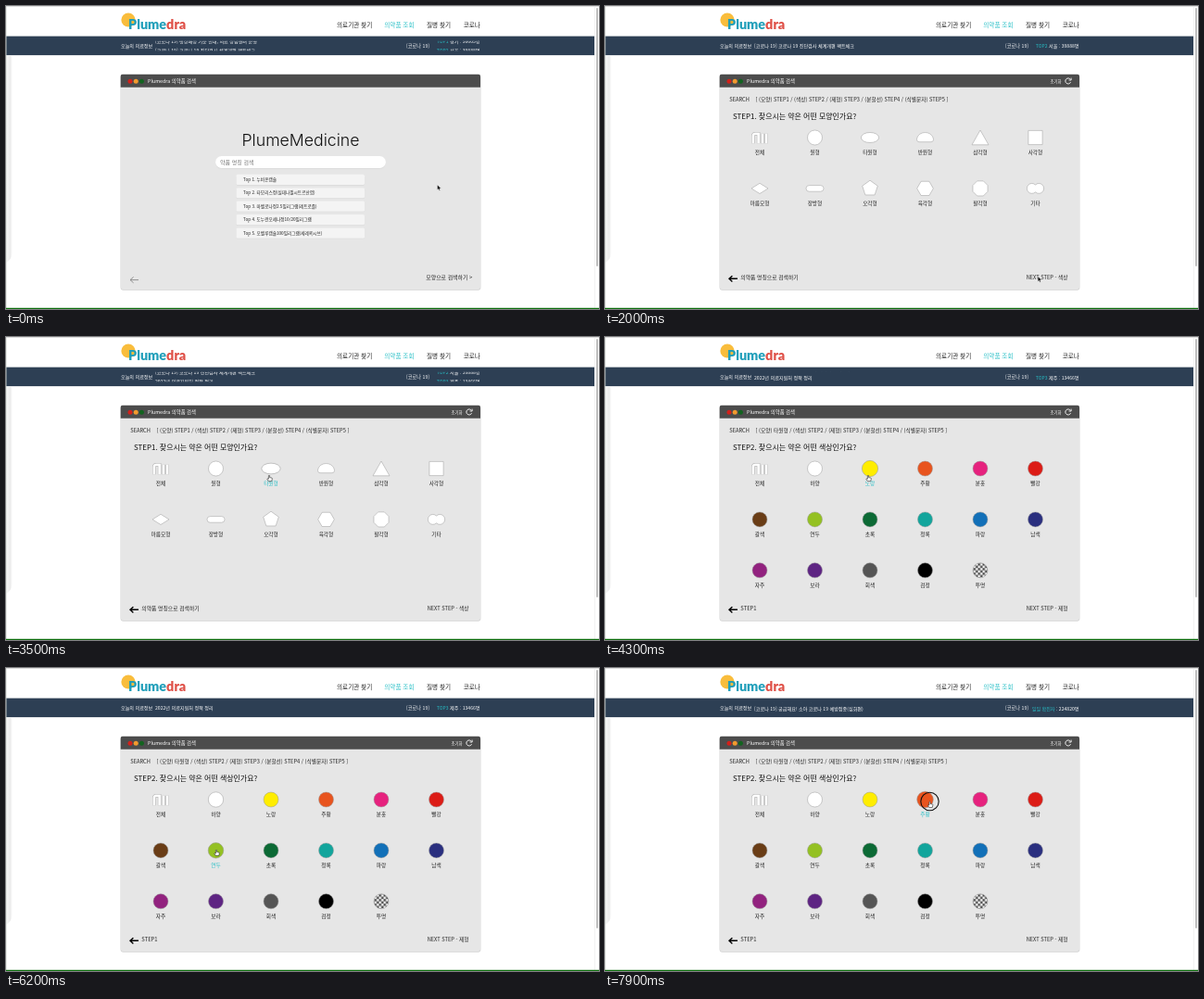
These frames come from a looping animation (640 px wide and 327 px high, 8000 ms). An HTML page:

```html
<!DOCTYPE html>
<html lang="ko">
<head>
<meta charset="utf-8">
<title>의약품 검색</title>
<style>
  html, body { margin: 0; width: 100%; height: 100%; overflow: hidden; background: #fff; }
  svg { display: block; width: 100%; height: 100%; }
  text { font-family: "Noto Sans CJK KR", "Noto Sans CJK", "Noto Sans", sans-serif; font-weight: 300; white-space: pre; }
  .brand { font-family: Lato, sans-serif; font-weight: 900; }
  .title { font-family: Inter, sans-serif; font-weight: 300; }
</style>
</head>
<body>
<svg id="stage" viewBox="0 0 640 327" preserveAspectRatio="none">
  <defs>
    <linearGradient id="edge">
      <stop stop-color="#f8f8f8"/><stop offset=".65" stop-color="#ebebeb"/><stop offset="1" stop-color="#fff"/>
    </linearGradient>
    <clipPath id="tickerClip"><rect x="120" y="37.8" width="400" height="10.4"/></clipPath>
    <pattern id="checker" width="5" height="5" patternUnits="userSpaceOnUse" x="-2.5" y="-2.5">
      <rect width="5" height="5" fill="#fff"/><path d="M0 0h2.5v5H5V2.5H0z" fill="#444"/>
    </pattern>
  </defs>
</svg>
<script>
const NS = 'http://www.w3.org/2000/svg';
const LOOP = 8000;
const TEAL = '#27bfc6';
const INK = '#222';
const stage = document.getElementById('stage');

function el(parent, tag, attrs = {}) {
  const node = document.createElementNS(NS, tag);
  for (const key in attrs) node.setAttribute(key, attrs[key]);
  parent.appendChild(node);
  return node;
}
const group = (parent, attrs) => el(parent, 'g', attrs);
const rect = (parent, x, y, width, height, fill, rx = 0) =>
  el(parent, 'rect', { x, y, width, height, fill, rx });
const circle = (parent, cx, cy, r, fill) => el(parent, 'circle', { cx, cy, r, fill });

// Places text by its vertical centre.
function label(parent, str, x, cy, size, fill = INK, anchor = 'start') {
  const node = el(parent, 'text', { x, y: cy + size * 0.37, 'font-size': size, fill, 'text-anchor': anchor });
  node.textContent = str;
  return node;
}

function polygon(sides, r, turn) {
  const points = [];
  for (let i = 0; i < sides; i++) {
    const a = turn + i * 2 * Math.PI / sides;
    points.push(`${(r * Math.cos(a)).toFixed(2)} ${(r * Math.sin(a)).toFixed(2)}`);
  }
  return `M${points.join('L')}Z`;
}

// Page header
rect(stage, 0, 0, 640, 327, '#fff');
el(stage, 'path', { d: 'M0 54H7V266Q6 274 0 277z', fill: 'url(#edge)' });
circle(stage, 132, 15, 7.6, '#f9bd3c');
const brand = label(stage, 'Plume', 132, 19.5, 14.4, '#219fba');
brand.setAttribute('class', 'brand');
el(brand, 'tspan', { fill: '#df5148' }).textContent = 'dra';
[['의료기관 찾기', 357], ['의약품 조회', 408.3], ['질병 찾기', 454], ['코로나', 493.7]]
  .forEach(([str, x], i) => label(stage, str, x, 20.3, 6.6, i === 1 ? TEAL : INK));

// News ticker
rect(stage, 0, 32.6, 635, 20.5, '#2d3f54');
label(stage, '오늘의 의료정보', 124, 42.7, 5.1, '#fff');
label(stage, '[코로나 19]', 432, 42.7, 5.2, '#fff');
const news = [
  ['[코로나 19] 병상배정 기준 안내, 의료 상담센터 운영', 'TOP1', '경기 : 50605명'],
  ['[코로나 19] 코로나 19 진단검사 체계개편 팩트체크', 'TOP2', '서울 : 39888명'],
  ['2022년 의료지원처 정책 정리', 'TOP3', '제주 : 13466명'],
  ['[코로나 19] 궁금해요! 소아 코로나 19 예방접종(심화편)', '일일 확진자', ': 224820명']
];
const ticker = group(stage, { 'clip-path': 'url(#tickerClip)' });
const newsRows = news.map(([headline, tag, count]) => {
  const row = group(ticker);
  label(row, headline, 161, 42.8, 5.12, '#fff');
  const total = label(row, '', 511.5, 42.8, 5.1, '#fff', 'end');
  el(total, 'tspan', { fill: TEAL }).textContent = tag;
  el(total, 'tspan').textContent = ' ' + count;
  return row;
});

// Window frame
rect(stage, 123.6, 74.4, 388.8, 232.4, '#d2d2d2', 3);
rect(stage, 123.8, 74, 388.2, 232, '#e6e6e6', 3);
el(stage, 'path', { d: 'M123.7 87.7V75.8q0-2 2-2H510q2 0 2 2V87.7z', fill: '#4c4c4c' });
['#d3201a', '#f29a2e', '#12631f'].forEach((fill, i) => circle(stage, 134 + i * 6.2, 81.2, 2.5, fill));
label(stage, 'Plumedra 의약품 검색', 153, 80.7, 5.35, '#fff');

// Search page
const pages = [0, 1, 2].map(() => group(stage));
const home = pages[0];
label(home, 'PlumeMedicine', 318, 144, 17.7, '#111', 'middle').setAttribute('class', 'title');
rect(home, 226, 162.6, 184, 13, '#d4d4d4', 6.5);
rect(home, 226, 162, 184, 13, '#fff', 6.5);
label(home, '약품 명칭 검색', 231, 168.4, 6, '#777');
['누비온캡슐', '타모리스정(실데나필시트르산염)', '마벨로나정2.5밀리그램(레트로졸)',
  '도누란오세나정10/20밀리그램', '오벨루캡슐100밀리그램(세레콕시브)'].forEach((name, i) => {
  const y = 181.7 + i * 14.45;
  rect(home, 248.5, y + 0.5, 138.5, 11.2, '#d6d6d6', 1.5);
  rect(home, 248.5, y, 138.5, 11.2, '#f4f4f4', 1.5);
  label(home, `Top ${i + 1}. ${name}`, 256, y + 5.6, 4.65);
});
el(home, 'path', { d: 'M143 295.6H134M137.6 292.4L134 295.6L137.6 298.8', fill: 'none', stroke: '#888', 'stroke-width': 0.9 });
label(home, '모양으로 검색하기 >', 503.3, 293, 5.9, INK, 'end');

// Step pages
const bars = 'M-7.2 6.3V-1.6Q-7.2-4.3-4.6-4.3H-1.4V6.3M2.9-4.3V6.3M7.2-4.3V6.3';
const shapes = [
  ['전체', bars],
  ['원형', 'M-8 0a8 8 0 1 0 16 0a8 8 0 1 0-16 0z'],
  ['타원형', 'M-9.6 0a9.6 5.5 0 1 0 19.2 0a9.6 5.5 0 1 0-19.2 0z'],
  ['반원형', 'M-9 2.2C-8-8 8-8 9 2.2Q9 4.7 6.5 4.7H-6.5Q-9 4.7-9 2.2z'],
  ['삼각형', 'M0-8L9 7.8H-9z'],
  ['사각형', 'M-7.6-7.6H7.6V7.6H-7.6z'],
  ['마름모형', 'M0-5.6L9 0L0 5.6L-9 0z'],
  ['장방형', 'M-6.2-3.3H6.2a3.3 3.3 0 0 1 0 6.6H-6.2a3.3 3.3 0 0 1 0-6.6z'],
  ['오각형', polygon(5, 8.7, -Math.PI / 2)],
  ['육각형', polygon(6, 8.8, 0)],
  ['팔각형', polygon(8, 8.7, Math.PI / 8)],
  ['기타', 'M0-3.9A5.4 5.4 0 1 0 0 3.9A5.4 5.4 0 1 0 0-3.9z']
];
const colours = [
  ['전체'], ['하양', '#fff'], ['노랑', '#ffed00'], ['주황', '#e8541e'], ['분홍', '#e6227e'], ['빨강', '#dc1c16'],
  ['갈색', '#6a3d16'], ['연두', '#94c122'], ['초록', '#0c6a35'], ['청록', '#12a59c'], ['파랑', '#1270b8'], ['남색', '#2a2f7f'],
  ['자주', '#92227f'], ['보라', '#5e2483'], ['회색', '#555'], ['검정', '#000'], ['투명', 'url(#checker)']
];
const items = [];

function addItem(page, i, name, d, fill) {
  const x = 167 + (i % 6) * 59.5;
  const y = 142 + Math.floor(i / 6) * 54.9;
  const icon = group(pages[page]);
  if (d === bars) {
    [['#aaa', 3.5], ['#fff', 2.6]].forEach(([stroke, w]) =>
      el(icon, 'path', { d, fill: 'none', stroke, 'stroke-width': w }));
  } else {
    el(icon, 'path', { d, fill, stroke: '#999', 'stroke-width': 0.5 });
  }
  items.push({ page, x, y, icon, text: label(pages[page], name, x, y + 16, 5.7, INK, 'middle') });
}

function addStep(page, question, chosen, back, next) {
  const g = pages[page];
  label(g, '초기화', 480.5, 81, 4.4, '#fff');
  el(g, 'path', { d: 'M502.4 79.3A3 3 0 1 0 502.6 82.2M503.1 77.6V80H500.6', fill: 'none', stroke: '#fff', 'stroke-width': 0.9 });
  label(g, 'SEARCH', 134.3, 100.8, 5.7);
  label(g, `[ (모양) ${chosen} / (색상) STEP2 / (제형) STEP3 / (분할선) STEP4 / (식별문자) STEP5 ]`, 162.5, 100.8, 5.7);
  label(g, `STEP${page}. 찾으시는 약은 어떤 ${question}인가요?`, 138, 119, 7.95, '#111');
  el(g, 'path', { d: 'M143 294.3H134M137.4 291.2L134 294.3L137.4 297.4', fill: 'none', stroke: '#000', 'stroke-width': 1.4 });
  label(g, back, 146.3, 293, 5.85);
  label(g, `NEXT STEP - ${next}`, 499.5, 293, 5.7, INK, 'end');
}
addStep(1, '모양', 'STEP1', '의약품 명칭으로 검색하기', '색상');
shapes.forEach(([name, d], i) => addItem(1, i, name, d, '#fff'));
addStep(2, '색상', '타원형', 'STEP1', '제형');
colours.forEach(([name, fill], i) => addItem(2, i, name, i ? shapes[1][1] : bars, fill));

// Browser edges
rect(stage, 0, 0, 640, 0.6, '#c8c8c8');
rect(stage, 0, 0, 0.5, 327, '#ccd4cc');
rect(stage, 635, 0, 0.5, 327, '#e4e4e4');
rect(stage, 637, 2, 2, 279, '#bdbdbd', 1);
rect(stage, 0, 325.8, 640, 1.2, '#0f6f0f');

// Pointer
const ring = el(stage, 'circle', { fill: 'none', stroke: '#111', 'stroke-width': 1.1 });
const pointer = group(stage);
const arrow = el(pointer, 'path', {
  d: 'M0 0V5.6L1.3 4.4L2.2 6.3L3.1 5.9L2.3 4H4z', fill: '#000', stroke: '#fff', 'stroke-width': 0.4
});
const hand = el(pointer, 'path', {
  d: 'M-.6 .6Q0-.4 .6 .6V2.6L3 3.1Q3.5 3.4 3.3 4.2L2.7 6.6H-.6L-2.2 4.2Q-2 3.3-.6 4.2z',
  fill: '#fff', stroke: '#222', 'stroke-width': 0.6
});

// time, x, y
const path = [
  [0, 465.5, 193], [450, 465.5, 193], [1050, 469.5, 293], [1900, 469.5, 293], [2500, 439, 278], [2650, 439, 278],
  [3400, 284, 149], [4300, 284, 149], [5100, 228.5, 146], [5700, 228.5, 146], [6200, 227, 196], [6550, 227, 196],
  [6900, 261.5, 165.5], [7550, 350.5, 144], [8000, 350.5, 144]
];
const clicks = [1500, 3800, 7750];
const pageAt = t => t < 1700 ? 0 : t < 4000 ? 1 : 2;

function pointerAt(t) {
  const i = Math.max(1, path.findIndex(p => p[0] >= t));
  const [t0, x0, y0] = path[i - 1];
  const [t1, x1, y1] = path[i];
  const k = Math.max(0, Math.min(1, (t - t0) / (t1 - t0)));
  const e = k * k * (3 - 2 * k);
  return [x0 + (x1 - x0) * e, y0 + (y1 - y0) * e];
}

function isOver(item, t) {
  if (item.page !== pageAt(t)) return false;
  const [x, y] = pointerAt(t);
  return Math.abs(x - item.x) < 11 && y > item.y - 9 && y < item.y + 19;
}

// Averaging the recent hover state gives a smooth grow and shrink.
function hoverAmount(item, t) {
  let sum = 0;
  for (let i = 0; i < 10; i++) sum += isOver(item, Math.max(0, t - i * 40));
  return sum / 10;
}

function drawTicker(t) {
  const clock = t + 374, step = 3540;
  const current = 1 + Math.floor(clock / step);
  const rest = 10 * Math.exp(-(clock % step) / 540);
  newsRows.forEach((row, i) => {
    row.style.display = i === current || i === current - 1 ? '' : 'none';
    row.setAttribute('transform', `translate(0 ${rest + (i - current) * 10})`);
  });
}

function draw(t) {
  drawTicker(t);
  const page = pageAt(t);
  const [x, y] = pointerAt(t);
  pages.forEach((g, i) => { g.style.display = i === page ? '' : 'none'; });

  let overLink = page === 0 && x > 453 && y > 287;
  for (const item of items) {
    if (item.page !== page) continue;
    const over = isOver(item, t);
    overLink = overLink || over;
    item.text.setAttribute('fill', over ? TEAL : INK);
    item.icon.setAttribute('transform', `translate(${item.x} ${item.y}) scale(${1 + 0.1 * hoverAmount(item, t)})`);
  }

  pointer.setAttribute('transform', `translate(${x} ${y})`);
  arrow.style.display = overLink ? 'none' : '';
  hand.style.display = overLink ? '' : 'none';

  const click = clicks.find(c => t >= c && t < c + 250);
  ring.style.display = click === undefined ? 'none' : '';
  if (click !== undefined) {
    ring.setAttribute('cx', x);
    ring.setAttribute('cy', y);
    ring.setAttribute('r', 6 + 3.7 * Math.min(1, (t - click) / 130));
  }
}

const start = performance.now();
function frame() {
  draw((performance.now() - start) % LOOP);
  requestAnimationFrame(frame);
}
frame();
</script>
</body>
</html>
```
